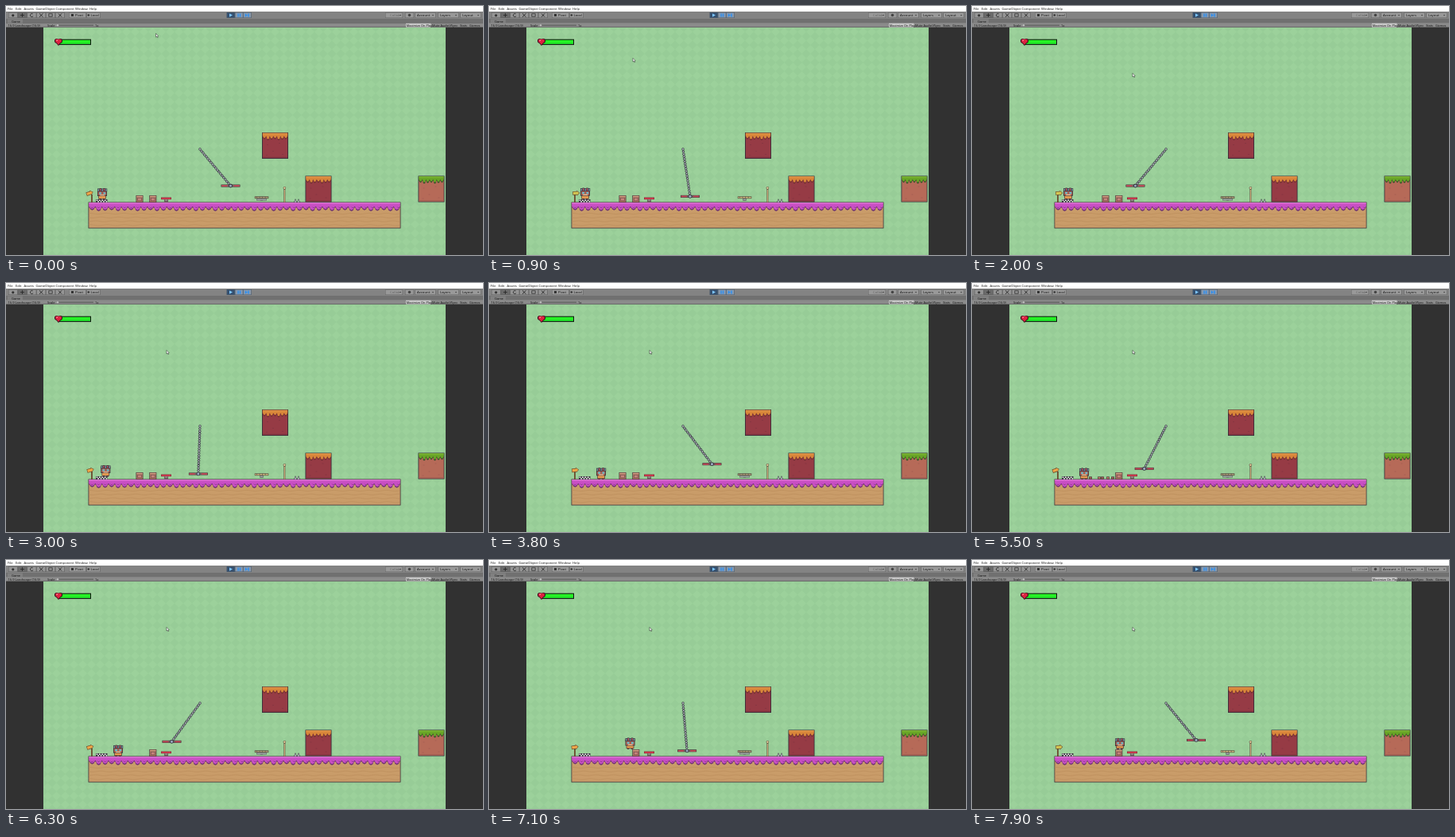
Write an HTML page with a canvas that moves like this. It is 600 by 313 pixels and loops after 8 s.

```html
<!DOCTYPE html>
<html lang="en">
<head>
<meta charset="utf-8">
<title>Platformer preview</title>
<style>
html, body { margin: 0; width: 100%; height: 100%; overflow: hidden; background: #313131; }
canvas { display: block; width: 600px; height: 313px; }
</style>
</head>
<body>
<canvas id="stage" width="600" height="313"></canvas>
<script>
const W = 600, H = 313, LOOP = 8000, TAU = Math.PI * 2;
const INK = '#2f2b38';
const stage = document.getElementById('stage').getContext('2d');
const scene = document.createElement('canvas');
scene.width = W;
scene.height = H;
let c = scene.getContext('2d');

function rect(x, y, w, h, color) {
  c.fillStyle = color;
  c.fillRect(x, y, w, h);
}
function boxed(x, y, w, h, color, edge = INK, t = .8) {
  rect(x, y, w, h, edge);
  rect(x + t, y + t, w - 2 * t, h - 2 * t, color);
}
function poly(color, ...pts) {
  c.fillStyle = color;
  c.beginPath();
  for (let i = 0; i < pts.length; i += 2) c.lineTo(pts[i], pts[i + 1]);
  c.closePath();
  c.fill();
}
function disc(x, y, r, color) {
  c.fillStyle = color;
  c.beginPath();
  c.arc(x, y, r, 0, TAU);
  c.fill();
}
function line(color, width, ...pts) {
  c.strokeStyle = color;
  c.lineWidth = width;
  c.beginPath();
  for (let i = 0; i < pts.length; i += 2) c.lineTo(pts[i], pts[i + 1]);
  c.stroke();
}
function label(text, x, y, size = 4, color = '#111') {
  c.font = `${size}px "Open Sans", "Noto Sans", sans-serif`;
  c.fillStyle = color;
  c.fillText(text, x, y);
}
const lerp = (a, b, k) => a + (b - a) * Math.min(1, Math.max(0, k));

// Piecewise linear track of [time, value...] keys
function track(keys, t) {
  let i = 0;
  while (i < keys.length - 2 && t >= keys[i + 1][0]) i++;
  const [a, b] = [keys[i], keys[i + 1]];
  return a.slice(1).map((v, n) => lerp(v, b[n + 1], (t - a[0]) / (b[0] - a[0])));
}

function drawTools() {
  for (let i = 0; i < 6; i++) boxed(3 + i * 11.8, 8.2, 11.6, 6.8, i === 1 ? '#6b6b6b' : '#959595', '#5c5c5c', .5);
  disc(8.8, 11.8, 1.6, '#333');
  line('#222', .8, 18, 11.6, 23, 11.6);
  line('#222', .8, 20.5, 9.2, 20.5, 14);
  c.strokeStyle = '#222';
  c.beginPath();
  c.arc(32.5, 11.6, 2, .6, 5.4);
  c.stroke();
  line('#222', .9, 42, 9.4, 46.5, 13.8);
  line('#222', .9, 46.5, 9.4, 42, 13.8);
  boxed(53.5, 9.5, 5, 4, '#959595', '#222', .7);
  line('#222', .9, 66, 13.8, 70, 9.4);
  line('#222', .9, 66, 9.6, 70, 13.6);
}

function drawEditor() {
  rect(0, 0, W, 7, '#fff');
  [['File', 2], ['Edit', 12], ['Assets', 22.5], ['GameObject', 37.5], ['Component', 62.5],
    ['Window', 87], ['Help', 105]].forEach(([s, x]) => label(s, x, 4.6, 4.2));
  rect(0, 7, W, 9, '#838383');
  drawTools();
  [[79, 21.5, 'Pivot', 87], [101.5, 17, 'Local', 106.5], [477, 22, 'Collab', 483], [502, 11, '', 0],
    [514.5, 26, 'Account', 517], [543.5, 26, 'Layers', 546], [571.5, 26, 'Layout', 574]]
    .forEach(([x, w, s, tx], i) => {
      boxed(x, 8.2, w, 6.8, '#999', '#656565', .5);
      label(s, tx, 13.1, 4.3, i === 2 ? '#666' : '#111');
    });
  rect(82, 10, 3, 3, '#333');
  disc(103.8, 11.5, 1.3, '#333');
  disc(507.5, 11.5, 1.8, '#444');
  for (const x of [496, 537, 566, 594]) poly('#333', x - 1, 11, x + 1, 11, x, 12.5);

  ['#35506f', '#8899ad', '#8899ad'].forEach((color, i) => boxed(277.5 + i * 10.4, 8, 10.4, 7, color, '#4b5868', .5));
  poly('#7ec8ff', 281, 9.4, 281, 13.8, 285, 11.6);
  for (const x of [291.3, 293.8, 304.3]) rect(x, 9.6, 1.5, 4, '#2f8ff0');
  poly('#2f8ff0', 300.7, 9.4, 300.7, 13.8, 304, 11.6);

  rect(0, 16, W, 5.5, '#707070');
  rect(2, 16.5, 19, 5, '#808080');
  label('Game', 7, 20.6);
  rect(0, 21.5, W, 5.5, '#8b8b8b');
  rect(0, 26.4, W, .6, '#555');
  label('16:9 Landscape (16:9)', 2.5, 25.5);
  label('Scale', 52, 25.5);
  line('#444', .8, 64, 24.2, 110, 24.2);
  disc(65, 24.2, 1.2, '#bbb');
  label('1x', 112, 25.5);
  rect(503, 21.8, 31.5, 4.8, '#c9c9c9');
  [['Maximize On Play', 503.7], ['Mute Audio', 536], ['VSync', 557.5], ['Stats', 571], ['Gizmos', 583]]
    .forEach(([s, x]) => label(s, x, 25.5, 3.9));
}

function drawBackdrop() {
  rect(0, 27, W, 286, '#313131');
  c.save();
  c.beginPath();
  c.rect(47, 27, 506, 286);
  c.clip();
  rect(47, 27, 506, 286, '#9cd19b');
  const d = 11;
  for (let y = 27; y < H + d; y += d) {
    for (let x = 47; x < 553 + d; x += d) {
      poly('#97cc97', x, y - d / 2, x + d / 2, y, x, y + d / 2, x - d / 2, y);
    }
  }
  c.restore();
}

// Dripping fringe along the top edge of terrain
function fringe(x, y, w, step, depth, color, light, dark) {
  const n = Math.round(w / step), s = w / n;
  for (const [drop, col] of [[1.5, dark], [0, color]]) {
    rect(x, y, w, depth * .55 + drop, col);
    for (let i = 0; i < n; i++) {
      const left = x + i * s, len = depth + (i * 5 % 3 - 1) * .6 + drop;
      poly(col, left, y + depth * .45, left + s, y + depth * .45, left + s * .78, y + len - 1.2,
        left + s * .5, y + len, left + s * .22, y + len - 1.2);
    }
  }
  rect(x, y, w, 1.2, light);
}
function block(x, y, color, light, dark, body, shade) {
  boxed(x, y, 33, 33, body);
  [[6, 15], [21, 13], [13, 23], [25, 27], [5, 28]].forEach(([a, b]) => rect(x + a, y + b, 2, 1, shade));
  rect(x + 1, y + 30.5, 31, 1.5, shade);
  fringe(x + .8, y + .8, 31.4, 4.4, 7, color, light, dark);
}
function drawGround() {
  boxed(103.5, 246.5, 393, 33, '#c99c69', '#403038');
  for (let row = 0; row < 4; row++) {
    const pts = [];
    for (let x = 104.5; x < 496; x += 2.75) {
      pts.push(x, 261 + row * 4.8 + Math.sin(x * TAU / 22 + row * 2) * .6);
    }
    line('#bf915f', .9, ...pts);
  }
  fringe(104.3, 247.3, 391.4, 8.2, 8.6, '#c94fc4', '#e27ad8', '#6c3272');
  for (let x = 104.3; x < 490; x += 8.2) {
    poly('#853c8b', x + 1.6, 252.3, x + 4, 254.3, x + 6.4, 252.3, x + 4, 253.3);
  }
}

function crate(x) {
  boxed(x - 4.5, 238, 9, 9, '#ad7561', '#49343a', .7);
  rect(x - 3.7, 238.8, 7.4, 1.3, '#d0a084');
  boxed(x - 2.6, 241, 5.2, 4, '#c8857a', '#72494f', .6);
}

function drawProps() {
  // health bar
  boxed(67, 41.7, 40, 7.2, '#25f225', '#111', 1);
  rect(68, 46.7, 38, 1.2, '#1bcb28');
  const heart = (col, k) => {
    disc(66 - 2.1 * k, 43.8, 2.7 * k, col);
    disc(66 + 2.1 * k, 43.8, 2.7 * k, col);
    poly(col, 66 - 4.8 * k, 44.2, 66 + 4.8 * k, 44.2, 66, 44.2 + 5.6 * k);
  };
  heart('#3a1020', 1.05);
  heart('#dc2340', .82);
  rect(63.5, 42.6, 1.5, 1.3, '#ff92a0');

  const orange = ['#d9863a', '#e29a4a', '#6f2f30', '#963b45', '#873642'];
  block(322, 159, ...orange);
  block(376.5, 213.5, ...orange);
  block(518.5, 213.5, '#69a526', '#7fb935', '#35502a', '#b66a58', '#a75f53');
  drawGround();

  // checkered start pad
  rect(113, 243, 14.5, 4, '#39363f');
  for (let i = 0; i < 8; i++) rect(113.6 + i * 1.7, 243.5 + i % 2 * 1.6, 1.7, 1.5, '#f1f1ee');

  crate(184.8);

  // trampoline
  boxed(195, 240.5, 13, 2.7, '#dd3b50', '#7c2c39', .6);
  rect(199, 243.2, 5, 3.5, '#6b5a5e');
  rect(200, 243.5, 3, 1, '#b4a2a0');

  // pole
  boxed(349.4, 230, 2, 17, '#d0b07c', '#5a4a3d', .5);
  disc(350.4, 228.7, 1.8, '#4b4036');
  disc(350.4, 228.7, 1.2, '#ead7a0');

  // spikes
  for (const x of [364, 368]) {
    poly('#46484f', x - 2.1, 247, x, 242, x + 2.1, 247);
    poly('#c9ced2', x - 1.1, 246.6, x, 243.4, x + 1.1, 246.6);
  }
}

function drawSign(t) {
  const swing = -Math.cos(t / 368 * TAU);
  boxed(107, 237, 1.8, 10, '#8a6238', '#4b3a2d', .4);
  c.save();
  c.translate(107.5 + swing * 2.2, 235.3);
  c.rotate(-.2 + swing * .15);
  poly('#6a4a2c', -4.4, -2.4, 1, -2.4, 1, -3.5, 4.6, 0, 1, 3.2, 1, 2.3, -4.4, 2.3);
  poly(swing > .5 ? '#d3c552' : '#eda548', -3.8, -1.7, 1.5, -1.7, 1.5, -2.3, 3.8, 0, 1.5, 2.1, 1.5, 1.6, -3.8, 1.6);
  c.restore();
}

function drawFan(t) {
  const wide = Math.cos(t / 350 * TAU) > -.5;
  boxed(312.8, 239.3, 17.5, 2.8, wide ? '#a99b78' : '#cfb980', '#4a4338', .6);
  for (let x = 315; x < 329; x += 3.6) rect(x, 239.5, .8, 2.2, '#6b5f4e');
  rect(320, 242, 3, 2.5, '#55505a');
  const r = wide ? 6.5 : 2.5;
  boxed(321.5 - r, 242.1, 2 * r, 2.4, '#9ea6a2', '#585a5f', .5);
}

function drawPendulum(t) {
  const a = 40 * Math.PI / 180 * Math.cos((t - 40) / 3990 * TAU);
  const sx = Math.sin(a), sy = Math.cos(a), len = 60;
  const x = 244 + sx * len, y = 180 + sy * len;
  for (let d = 0; d < len - 2; d += 3.1) {
    disc(244 + sx * d, 180 + sy * d, 1.7, '#3b3c46');
    disc(244 + sx * d, 180 + sy * d, .9, '#b9bec4');
  }
  boxed(x - 12, y - 1.5, 24, 3, '#81676a', '#3c2a33', .6);
  rect(x - 11.2, y - .8, 7, 1.7, '#c74654');
  rect(x + 4.2, y - .8, 7, 1.7, '#c74654');
  disc(x, y, 2.4, INK);
  disc(x, y, 1.6, '#9aa9bd');
}

function drawShards(t) {
  const k = (t - 4300) / 1000;
  if (k < 0 || t >= 6200) return;
  [[159, 149], [164, 160], [168, 164], [172, 171], [175, 177]].forEach(([x0, x1], i) => {
    const x = lerp(168, x0, k / .2) + (x1 - x0) * lerp(0, 1, (k - .2) / .6);
    const y = Math.min(245, 242 - (106 - i * 2) * k + 190 * k * k - i % 2);
    boxed(x - 1.9, y - 1.6, 3.8, 3.2, i % 2 ? '#b77562' : '#955a4f', '#493238', .6);
  });
}

const walk = [[0, 121, 243.5], [2800, 121, 243.5], [3000, 125.3, 243.5], [3150, 129, 244.5],
  [3250, 132, 247], [3600, 141, 247], [6400, 141, 247], [7100, 177.5, 238], [7400, 186, 238], [8000, 186, 238]];

function drawHero(t) {
  let [x, y] = track(walk, t);
  const hop = (t - 6400) / 700;
  if (hop > 0 && hop < 1) y -= 24 * 4 * hop * (1 - hop);
  const moving = (t > 2800 && t < 3600) || (t > 6400 && t < 7400);
  const bob = moving ? 0 : Math.sin(t / 550 * TAU) * .5;
  c.save();
  c.translate(x, y);
  const step = moving ? Math.sin(t / 300 * TAU) : 0;
  rect(-3.8, -3 + step, 2.7, 3 - step, '#5b3540');
  rect(1, -3 - step, 2.7, 3 + step, '#5b3540');
  boxed(-4.8, -6, 9.6, 5, '#e69a50', '#4a2f33', .6);
  c.translate(0, bob);
  boxed(-6, -12.5, 12, 8, '#a85f50', INK, .7);
  for (let i = 0; i < 5; i++) {
    boxed(-6 + i * 2.4, -14 - (i % 2) * .5, 2.6, 4, i % 2 ? '#cc626c' : '#879ba6', INK, .6);
  }
  rect(-3.8, -9.2, 2.7, 2.2, '#69bfd0');
  rect(1.5, -9.2, 2.7, 2.2, '#69bfd0');
  rect(-2.8, -6.3, 6, 1.2, '#f0d0a4');
  c.restore();
}

const mouse = [[0, 188.5, 34.5], [900, 181, 65.5], [1800, 202, 84.5], [8000, 202, 84.5]];

function drawCursor(t) {
  const [x, y] = track(mouse, t);
  c.save();
  c.translate(x, y);
  const tip = [0, 0, 0, 4.6, 1.1, 3.7, 1.9, 5.3, 2.6, 5, 1.9, 3.4, 3.2, 3.3];
  poly('#fff', ...tip);
  line('#222', .5, ...tip, 0, 0);
  c.restore();
}

drawEditor();
drawBackdrop();
drawProps();
c = stage;

function frame(now) {
  const t = Math.floor(now % LOOP / 100) * 100;
  c.drawImage(scene, 0, 0);
  drawSign(t);
  if (t < 4300) crate(168);
  drawFan(t);
  drawPendulum(t);
  drawShards(t);
  drawHero(t);
  drawCursor(t);
  requestAnimationFrame(frame);
}
requestAnimationFrame(frame);
</script>
</body>
</html>
```
